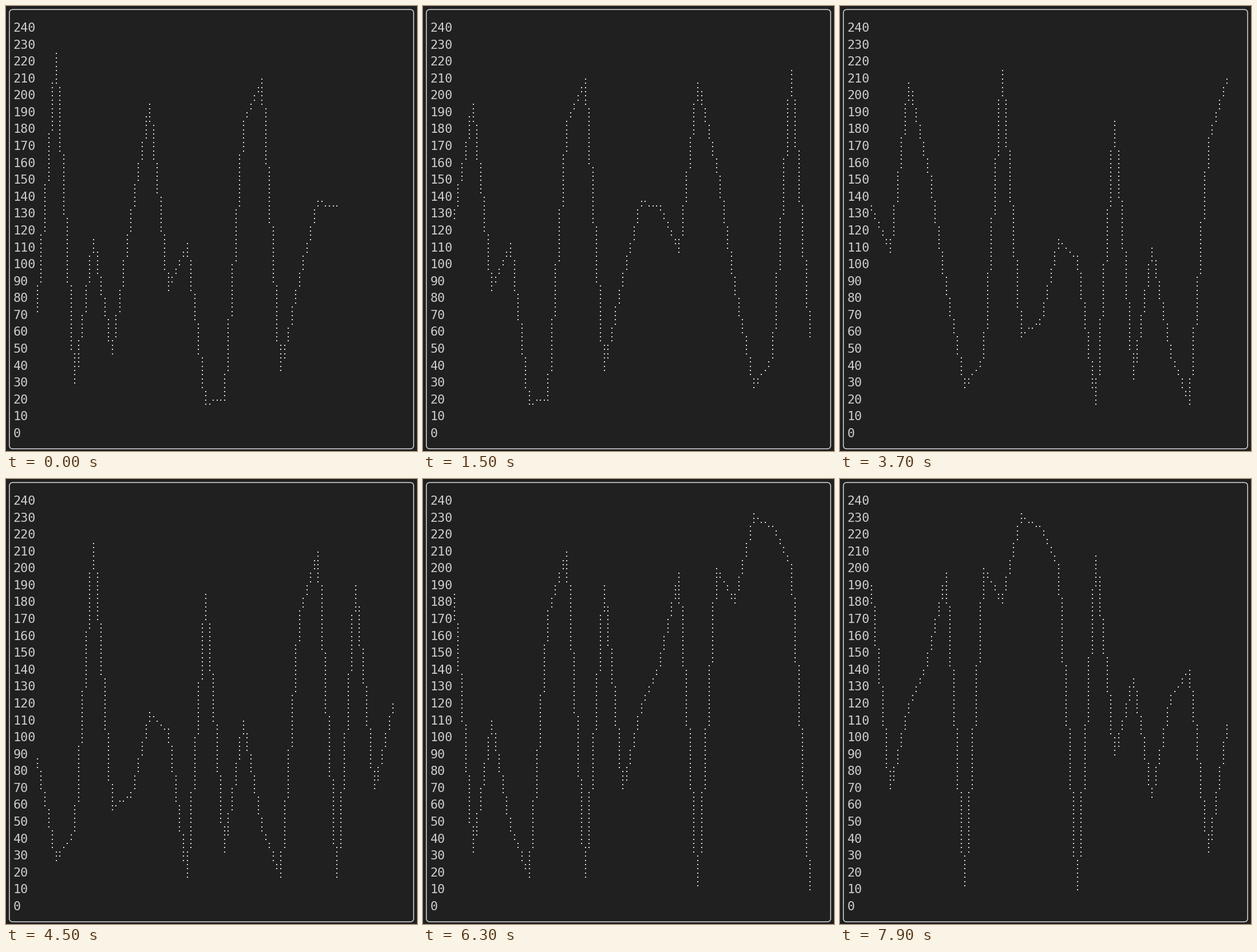
A matplotlib script that plays this animation: 718 by 779 pixels, repeating every 8000 ms.

```python
import numpy as np
import matplotlib.pyplot as plt
from matplotlib.animation import FuncAnimation
from matplotlib.patches import FancyBboxPatch

W, H, DPI = 718, 779, 100
PX = 72 / DPI                       # one pixel in points
CELL_W, CELL_H = 13.08, 29.58       # terminal cell, 2 x 4 braille dots
DOT_X, DOT_Y = 54.9, 24.3           # centre of the top left dot
STEP, WINDOW, START = 5, 20, 17     # dots per sample, samples visible, samples at start
BG, INK, DOT = "#202020", "#cecece", "#e2e2e2"
FRAME_MS, FRAMES = 100, 80

# Stream of samples as dot rows, counted from the top
ROWS = [69, 8, 86, 52, 79, 47, 20, 64, 53, 91, 90, 25, 14, 83, 61, 43, 44, 55, 15,
        34, 63, 87, 80, 12, 75, 72, 52, 56, 91, 24, 85, 54, 79, 91, 29, 14, 91, 22,
        70, 50, 40, 19, 93, 18, 26, 5, 8, 17, 94, 15, 62, 44, 72, 48, 42, 85, 55]

# Frames at which a new sample arrives
TICKS = [2, 4, 6, 8, 10, 12, 14, 15, 18, 20, 22, 23, 25, 27, *range(29, FRAMES, 2)]


def line(x, y, x1, y1):
    """Dots of a left-to-right line; the error is re-read between the two tests."""
    dx, dy = x1 - x, -abs(y1 - y)
    sy = 1 if y < y1 else -1
    err = dx + dy
    dots = []
    while True:
        dots.append((x, y))
        if 2 * err >= dy:
            if x == x1:
                break
            err += dy
            x += 1
        if 2 * err <= dx:
            if y == y1:
                break
            err += dx
            y += sy
    return dots


def chart(frame):
    end = START + sum(t <= frame for t in TICKS)
    rows = ROWS[max(0, end - WINDOW):end]
    dots = {((len(rows) - 1) * STEP, rows[-1])}
    for i, (a, b) in enumerate(zip(rows, rows[1:])):
        dots.update(line(i * STEP, a, (i + 1) * STEP, b))
    grid = np.array(sorted(dots), float)
    return grid * (CELL_W / 2, CELL_H / 4) + (DOT_X, DOT_Y)


fig = plt.figure(figsize=(W / DPI, H / DPI), dpi=DPI, facecolor=BG)
ax = fig.add_axes([0, 0, 1, 1])
ax.set_xlim(0, W)
ax.set_ylim(H, 0)
ax.axis("off")

ax.add_patch(FancyBboxPatch((5.9, 6.2), 706.2, 769,
                            boxstyle="round,pad=0,rounding_size=6",
                            fill=False, ec=INK, lw=1.6 * PX))
for i in range(25):
    ax.text(12.4, 45 + i * CELL_H, str(240 - 10 * i), color=INK, va="baseline",
            family="DejaVu Sans Mono", size=21.8 * PX)

dots = ax.scatter([], [], s=(2.9 * PX) ** 2, marker="s", color=DOT, linewidths=0)


def update(frame):
    dots.set_offsets(chart(frame))
    return [dots]


anim = FuncAnimation(fig, update, frames=FRAMES, interval=FRAME_MS,
                     init_func=lambda: update(0), repeat=True)
plt.show()
```
